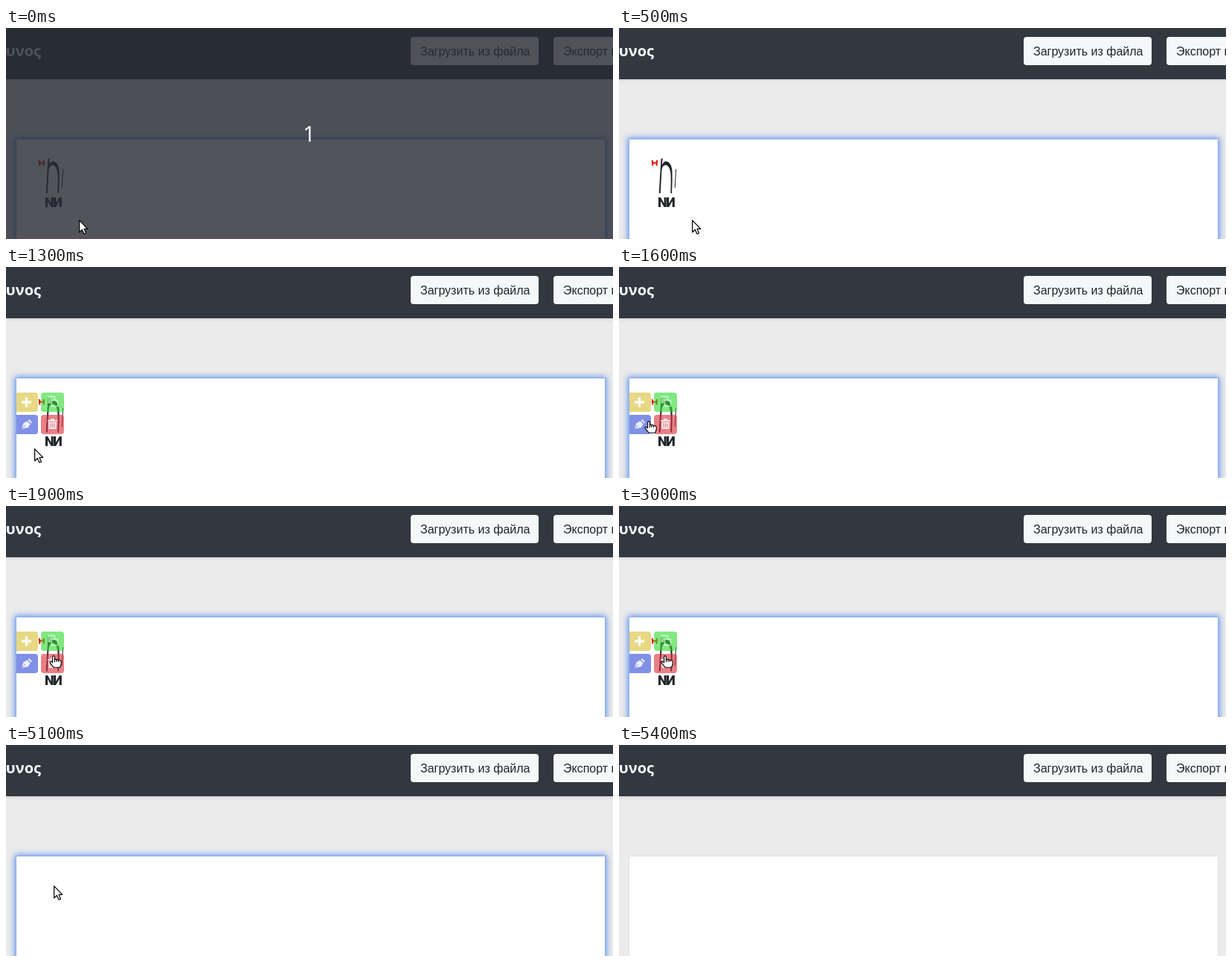
Animation of 816 by 284 pixels, one loop 5900 ms. Source, as an HTML page:

```html
<!DOCTYPE html>
<html lang="ru">
<head>
<meta charset="utf-8">
<style>
html, body { margin: 0; width: 100%; height: 100%; overflow: hidden; background: #ebebeb; }
body { position: relative; }
header { position: absolute; width: 816px; height: 69px; background: #31383f; box-shadow: 0 2px 4px rgba(0,0,0,.09); }
#sheet { position: absolute; left: 13px; top: 149px; width: 791px; height: 200px; background: #fff; border: 1px solid #e0e0e0; }
#glow { position: absolute; inset: -1px; border: 1px solid #8fb0ee; box-shadow: 0 0 8px 1px rgba(65,125,240,.85); }
svg { position: absolute; left: 0; top: 0; }
.label { font: 16px "Liberation Sans", Arial, sans-serif; fill: #212529; }
.brand { font: bold 20px "Open Sans", "Noto Sans", sans-serif; fill: #f5f8f8; text-anchor: end; }
.count { font: 30px "Open Sans", "Noto Sans", sans-serif; fill: #fff; text-anchor: middle; }
.syllable { font: 900 18px Roboto, sans-serif; letter-spacing: -1.5px; fill: #212529; }
.cursor { fill: #fff; stroke: #000; stroke-linejoin: round; }
</style>
</head>
<body>
<header></header>
<div id="sheet"><div id="glow"></div></div>
<svg width="816" height="284" viewBox="0 0 816 284">
  <clipPath id="inside"><rect x="14" y="150" width="791" height="134"/></clipPath>
  <text class="brand" x="47" y="38">ρυνος</text>
  <g fill="#f5f8f8">
    <rect x="544" y="12" width="172" height="38" rx="4"/>
    <rect x="736" y="12" width="150" height="38" rx="4"/>
  </g>
  <text class="label" x="557" y="37">Загрузить из файла</text>
  <text class="label" x="749" y="37">Экспорт в файл</text>

  <g id="sign">
    <path d="M44.7 178l.6 7.5M51 178l-.3 7.5M45 180.5q3 2.5 6 0" fill="none" stroke="#e8140c" stroke-width="2"/>
    <path fill="#212529" d="M56.5 176L58.7 175.5L57.7 185Q59.5 179.5 63 179.5Q70.5 180 71.5 193Q72 207 71 222.5L69.3 222.5Q70.2 203 69.2 194Q67.5 184.5 62.5 184.5Q58.5 184.5 57.5 191L55.7 222.5L53.7 222.5Z"/>
    <path d="M76.6 190L75.2 215" stroke="#212529"/>
    <text class="syllable" x="52" y="241">NИ</text>
  </g>

  <g id="tools" clip-path="url(#inside)">
    <g fill-opacity=".6">
      <rect x="12" y="169" width="31" height="26" rx="4" fill="#d7be32"/>
      <rect x="47" y="169" width="31" height="26" rx="4" fill="#2fd92f"/>
      <rect x="12" y="199" width="31" height="26" rx="4" fill="#2b46d5"/>
      <rect x="47" y="199" width="31" height="26" rx="4" fill="#d92b39"/>
    </g>
    <path d="M27.5 175.5v13M21 182h13" stroke="#fff" stroke-width="3.4" opacity=".9"/>
    <path d="M61 182.5h-3.5v-8h8v4.5M61.5 179.5h8v8h-8z" fill="none" stroke="#fff" stroke-width="1.3" opacity=".65"/>
    <g fill="#fff" opacity=".85">
      <path d="M21 218L23.5 210L28.5 207.5L32.5 211.5L30 216ZM29.5 206.5L31 205L35 209L33.5 210.5Z"/>
      <path d="M56 206h3.5l1-1.8h4l1 1.8H69v1.7H56zM57 208.7h11l-.7 9.3h-9.6z"/>
    </g>
    <path d="M21.5 217.5l4.5-4.5" stroke="#7e8de4"/>
    <path d="M60 210.2v6M62.5 210.2v6M65 210.2v6" stroke="#e07a83" stroke-width="1.1"/>
  </g>

  <g id="veil">
    <rect width="816" height="284" fill="#262a32" fill-opacity=".8"/>
    <rect y="283" width="816" height="1" fill="#7a3c50" fill-opacity=".4"/>
    <text class="count" x="407.5" y="153">1</text>
  </g>

  <path id="arrow" class="cursor" stroke-width="1.2" d="M.6 .8V17L4.3 13.5L7 19.3L9.5 18.2L7 12.3H11.8Z"/>
  <g id="hand" class="cursor" stroke-width="1.1">
    <path d="M4.6 10V2Q4.7.6 6 .6T7.4 2V5.6Q8.5 4.6 9.9 6Q11.3 5 12.5 6.6Q14 5.7 15.2 7.4Q16.2 7.5 16.2 9V12L14.5 16.3H6.2L1 9.9Q.6 8.5 1.8 8.2Q3 8.2 4.6 10Z"/>
    <path d="M7.4 5.6V9M9.9 6V9M12.5 6.6V9" fill="none"/>
  </g>
</svg>
<script>
const LOOP = 5900, $ = id => document.getElementById(id);
// time, pointer, left, top
const moves = [
  [0, "arrow", 98, 258], [1100, "arrow", 80, 259], [1200, "arrow", 52, 254],
  [1300, "arrow", 38, 244], [1400, "arrow", 36, 228], [1500, "hand", 33, 213],
  [1600, "hand", 34, 207], [1700, "hand", 42, 204], [1800, "hand", 52, 202],
  [1900, "hand", 58, 201], [3000, "hand", 56, 201], [3500, "arrow", 62, 201],
  [5100, "arrow", 64, 189], [5200, "arrow", 67, 112], [5300, "arrow", 72, 5],
  [5400, "none", 0, 0]
];
const show = (id, on) => $(id).style.display = on ? "" : "none";

function draw(now) {
  const t = now % LOOP;
  const [, kind, x, y] = moves.findLast(m => m[0] <= t);
  for (const id of ["arrow", "hand"]) {
    show(id, id === kind);
    $(id).setAttribute("transform", `translate(${x} ${y})`);
  }
  show("veil", t < 500);
  show("sign", t < 3500);
  show("tools", t >= 1200 && t < 3500);
  $("glow").style.opacity = t < 5300 ? 1 : t < 5400 ? .5 : 0;
  requestAnimationFrame(draw);
}
draw(performance.now());
</script>
</body>
</html>
```
